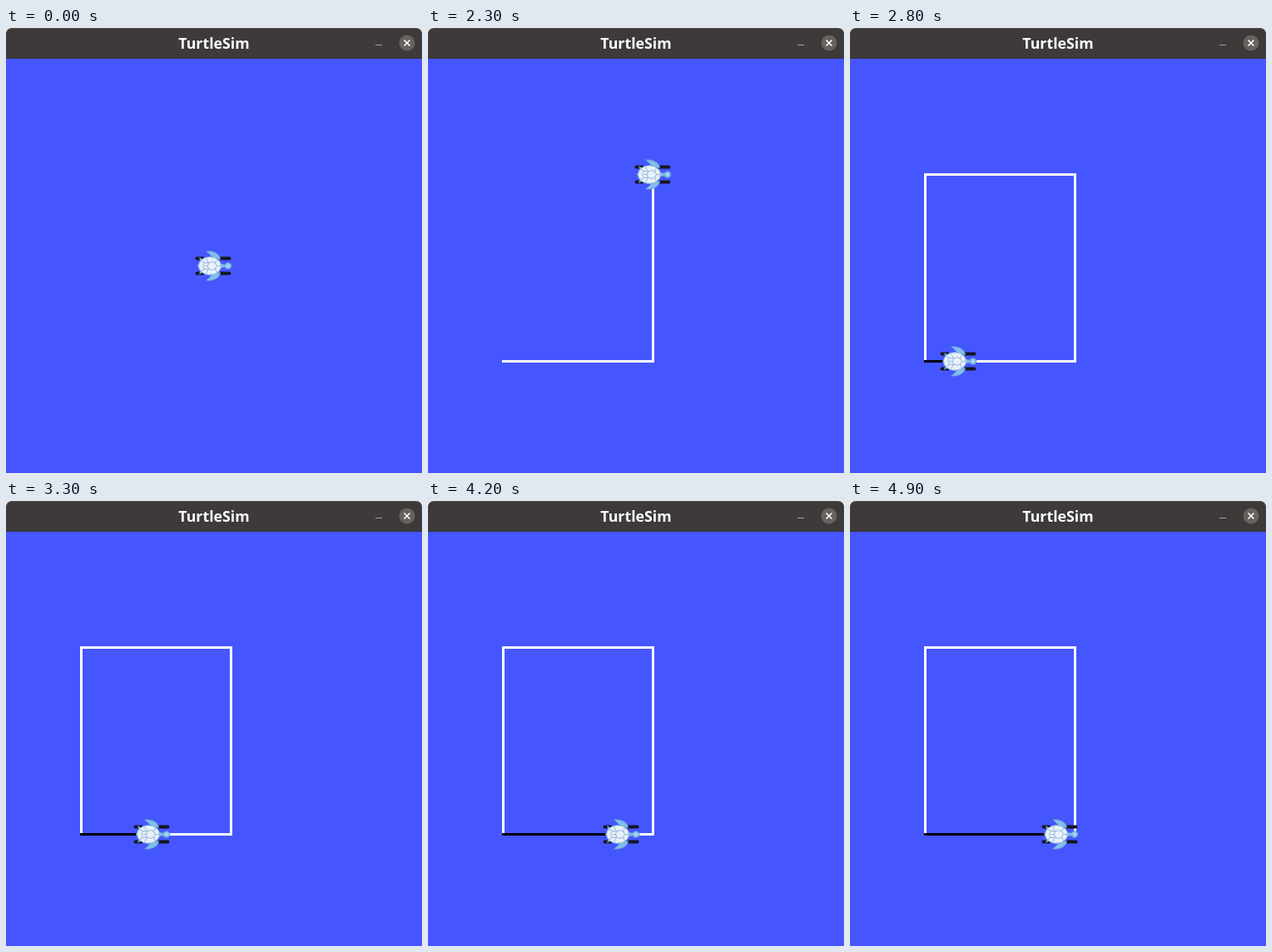
An HTML page for the animation above (5000 ms loop, 500 by 536 pixels).

```html
<!DOCTYPE html>
<html lang="en">
<head>
<meta charset="utf-8">
<title>TurtleSim</title>
<style>
  html, body { margin: 0; width: 100%; height: 100%; overflow: hidden; background: #4556ff; }
  svg { display: block; width: 500px; height: 536px; }
  .title { font: bold 17.8px "Noto Sans", "Open Sans", sans-serif; fill: #fff; text-anchor: middle; }
  .pen { fill: none; stroke-width: 3; }
</style>
</head>
<body>
<svg viewBox="0 0 500 536">
  <defs>
    <g id="limbs">
      <path d="M-20-9H-13M8-9H19" stroke="#14161f" stroke-width="4" stroke-linecap="round"/>
      <path d="M8-8C8-14 0-19-9-17.5C-5-15-4-12 1-9Z" fill="#82bdea" stroke="#5b93d4" stroke-width=".8"/>
      <path d="M-10-6L-17-10Q-17-6-12-4Z" fill="#82bdea" stroke="#5b93d4" stroke-width=".6"/>
    </g>
  </defs>

  <rect width="500" height="536" fill="#4556ff"/>
  <path d="M0 0H500V9H0Z" fill="#e4e4e4"/>
  <path d="M0 37V8Q0 0 8 0H492Q500 0 500 8V37Z" fill="#3d3a39"/>
  <path d="M7 .5H493" stroke="#4b4847"/>
  <path d="M0 36.5H500" stroke="#343040"/>
  <text class="title" x="250" y="25">TurtleSim</text>
  <path d="M444 20.5H452" stroke="#a3a19f"/>
  <circle cx="482" cy="18" r="9.5" fill="#656260"/>
  <path d="M478.5 14.5L485.5 21.5M485.5 14.5L478.5 21.5" stroke="#fff" stroke-width="1.6"/>

  <path class="pen" id="white" stroke="#fff"/>
  <path class="pen" id="black" stroke="#000"/>

  <g id="turtle">
    <use href="#limbs"/>
    <use href="#limbs" transform="scale(1 -1)"/>
    <path d="M-16-3L-20 0L-16 3Z" fill="#82bdea"/>
    <path d="M7-3L13-1.5Q15-4 18-4Q21.500-3 21.500 0Q21.500 3 18 4Q15 4 13 1.500L7 3Z" fill="#82bdea" stroke="#5b93d4" stroke-width=".8"/>
    <circle cx="17.500" r="2" fill="#a9d8ee"/>
    <ellipse cx="-4.500" rx="13.500" ry="10.800" fill="#e9f1f7" stroke="#8fbce4"/>
    <path d="M-6-3.500L-2-5L2-3.500L4 0L2 3.500L-2 5L-6 3.500L-7 0Z
             M-6-3.500L-9-9M2-3.500L4-8M-6 3.500L-9 9M2 3.500L4 8M4 0H8.500
             M-7 0H-11M-6-3.500L-11-4L-13 0L-11 4L-6 3.500M-11-4L-15-6M-11 4L-15 6"
          fill="none" stroke="#86addb" stroke-width=".9"/>
  </g>
</svg>
<script>
  const LOOP = 5000, STEP = 100;
  const LEFT = 90.5, RIGHT = 270.5, TOP = 176.5, BOTTOM = 401.5;
  const $ = id => document.getElementById(id);

  // Capped speed first, then a proportional approach to the corner.
  function cruise(t) {
    const s = (t - 2400) / 1000;
    const x = s < 1 ? 94.5 + 89.500 * s : RIGHT - 86.500 * Math.exp(-1.04 * (s - 1));
    return Math.round(x - .5) + .5;
  }

  function state(t) {
    if (t < 2300) return { x: 249.5, y: 286.5, white: "", black: "" };
    const corner = `M${LEFT - 1.5} ${BOTTOM}H${RIGHT}V${TOP}`;
    if (t < 2400) return { x: RIGHT, y: TOP, white: corner, black: "" };
    const x = cruise(t);
    return {
      x, y: BOTTOM,
      white: `${corner}H${LEFT}V${BOTTOM}`,
      black: `M${LEFT - 1.5} ${BOTTOM}H${x}`
    };
  }

  function draw(now) {
    const s = state(Math.floor(now % LOOP / STEP) * STEP);
    $("white").setAttribute("d", s.white);
    $("black").setAttribute("d", s.black);
    $("turtle").setAttribute("transform", `translate(${s.x} ${s.y})`);
  }

  const start = performance.now();
  function tick() {
    draw(performance.now() - start);
    requestAnimationFrame(tick);
  }
  tick();
</script>
</body>
</html>
```
